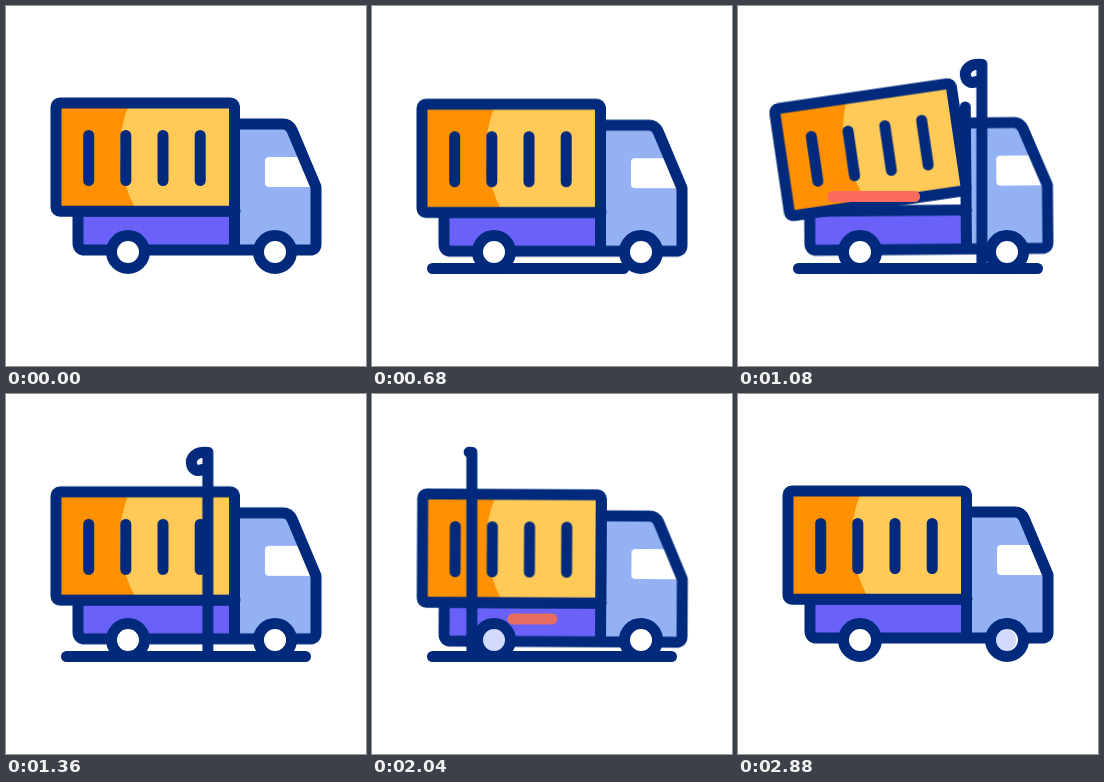
An HTML page that plays this animation: 360x360 px, repeating every 3 s.

```html
<!DOCTYPE html>
<html lang="en">
<head>
<meta charset="utf-8">
<title>Delivery truck</title>
<style>
  html, body { margin: 0; width: 100%; height: 100%; overflow: hidden; background: #fff; }
  svg { display: block; width: 100%; height: 100%; }
  svg * { animation: 3s linear infinite; }
  .ink { fill: none; stroke: #012a7c; stroke-width: 11; stroke-linecap: round; stroke-linejoin: round; }
  .trim { stroke-dasharray: 1 2; }

  .ground { animation-name: ground; }
  @keyframes ground {
    0%, 11% { stroke-dashoffset: 1.01; }
    25.6%, 80% { stroke-dashoffset: 0; }
    94.7%, 100% { stroke-dashoffset: -1.01; }
  }

  .post { animation-name: pass; }
  .post path { animation-name: post; }
  @keyframes pass {
    0%, 24% { transform: translateX(298px); }
    78.67%, 100% { transform: translateX(52px); }
  }
  @keyframes post {
    0%, 24.5% { stroke-dashoffset: 1.01; }
    34.5%, 66.5% { stroke-dashoffset: 0; }
    77.3%, 100% { stroke-dashoffset: 1.01; }
  }

  .body { transform-origin: 180px 246px; animation-name: bounce; animation-timing-function: ease-in-out; }
  @keyframes bounce {
    0% { transform: none; }
    8% { transform: translateY(.8px) rotate(.1deg); }
    15% { transform: translateY(-.4px); }
    22.67% { transform: translateY(1.2px); }
    36% { transform: translateY(-.6px) rotate(-.5deg); }
    43% { transform: translateY(1.5px); }
    49% { transform: translateY(-.5px); }
    54.67% { transform: none; }
    61% { transform: translateY(-1px); }
    68% { transform: translateY(3.6px) rotate(.3deg); }
    77% { transform: translateY(-2.6px) rotate(.2deg); }
    82.67% { transform: translate(-.6px, .4px) rotate(.5deg); }
    89% { transform: translateY(.6px); }
    95%, 100% { transform: none; }
  }

  .box { transform-origin: 50px 206px; animation-name: kick; animation-timing-function: ease-in-out; }
  @keyframes kick {
    0%, 28% { transform: none; }
    35.6% { transform: translate(2.4px, 4.5px) rotate(-7.9deg); }
    43%, 100% { transform: none; }
  }

  .streak { fill: none; stroke-width: 11; stroke-linecap: round; }
  .low { stroke: #fd6a60; animation-name: low; }
  .high { stroke: #d0995c; animation-name: high; }
  .mid { animation-name: mid; }
  @keyframes low {
    0%, 30% { stroke-dashoffset: 1.02; }
    36% { stroke-dashoffset: 0; }
    43%, 100% { stroke-dashoffset: -1.02; }
  }
  @keyframes high {
    0%, 51.5% { stroke-dashoffset: 1.02; }
    58% { stroke-dashoffset: 0; }
    66%, 100% { stroke-dashoffset: -1.02; }
  }
  @keyframes mid {
    0%, 54.4% { stroke: #d0995c; stroke-dashoffset: 1.02; }
    56% { stroke: #d0995c; }
    61.6% { stroke: #e56d61; stroke-dashoffset: 0; }
    72.5%, 100% { stroke: #e56d61; stroke-dashoffset: -1.02; }
  }

  .shine { fill: #d3dafc; }
  .rear { animation-name: rear; }
  .front { animation-name: front; }
  @keyframes rear {
    0%, 65% { transform: translateX(-24px); }
    67%, 69% { transform: none; }
    71%, 100% { transform: translateX(24px); }
  }
  @keyframes front {
    0%, 51.2% { transform: translateX(-24px); }
    56.9% { transform: translateX(24px); }
    56.91%, 94% { transform: translateX(-24px); }
    96%, 100% { transform: translateX(-3px); }
  }
</style>
</head>
<body>
<svg viewBox="0 0 360 360">
  <defs>
    <clipPath id="hub"><circle r="13"/></clipPath>
  </defs>

  <path class="ink trim ground" pathLength="1" d="M60.500 262.500H299.500"/>

  <g class="body">
    <path fill="#6a62f8" d="M72 205H229V244H79Q72 244 72 237Z"/>
    <path fill="#93b1f3" d="M229 118H277Q283 118 286 124L310 181V238Q310 244 304 244H229Z"/>
    <path fill="#fff" d="M263 151H297L310 181H263Q259 181 259 177V155Q259 151 263 151Z"/>
    <path class="ink" d="M229 205H72V237Q72 244 79 244H304Q310 244 310 238V181L286 124Q283 118 277 118H229"/>
    <path class="ink" d="M228.500 102V243"/>
    <g class="box">
      <rect x="50" y="97" width="178.500" height="108.300" rx="4" fill="#ffca57"/>
      <path fill="#ff9100" d="M50 97H123.500Q101 150 130.500 205H50Z"/>
      <rect class="ink" x="50" y="97" width="178.500" height="108.300" rx="4"/>
      <path class="ink" d="M82.700 129.500V174.500M119.800 129.500V174.500M157 129.500V174.500M194.200 129.500V174.500"/>
    </g>
  </g>

  <g transform="translate(122 246)">
    <circle r="16.500" fill="#fff"/>
    <g clip-path="url(#hub)"><circle class="shine rear" r="12"/></g>
    <circle class="ink" r="16.500"/>
  </g>
  <g transform="translate(269 246)">
    <circle r="16.500" fill="#fff"/>
    <g clip-path="url(#hub)"><circle class="shine front" r="12"/></g>
    <circle class="ink" r="16.500"/>
  </g>

  <path class="streak trim low" pathLength="1" d="M177 190.500H95"/>
  <path class="streak trim high" pathLength="1" d="M274 136H190"/>
  <path class="streak trim mid" pathLength="1" d="M239 225H141"/>

  <g class="post">
    <path class="ink trim" pathLength="1" d="M0 262V58.500C-10 57-17 62-16.500 69C-16 75-11 78-6 75.500"/>
  </g>
</svg>
</body>
</html>
```
